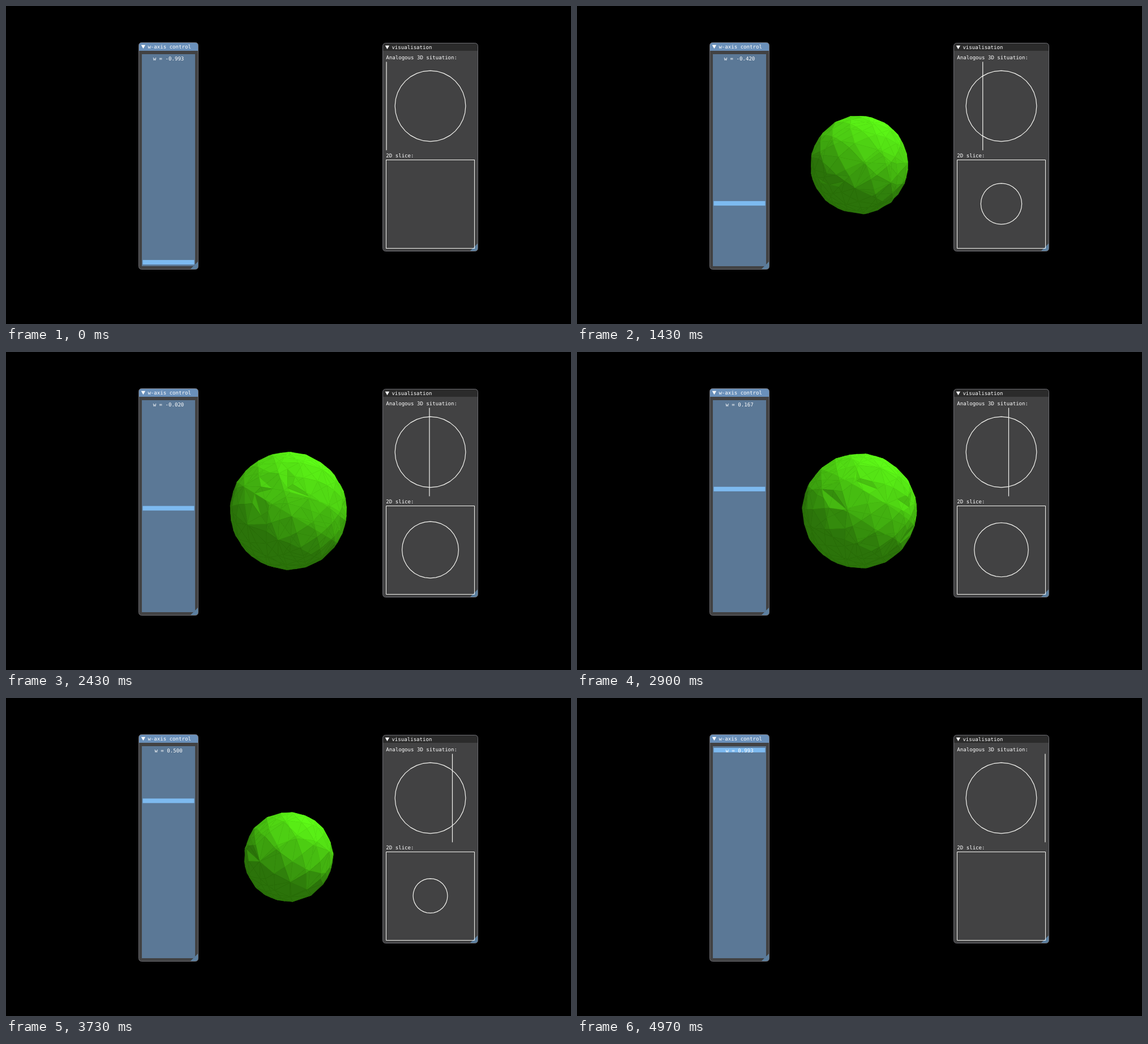
Animation of 998 by 561 pixels, one loop 5.01 s. Source, as an HTML page with a canvas:

```html
<!DOCTYPE html>
<html lang="en">
<head>
<meta charset="utf-8">
<title>4D sphere slices</title>
<style>
  html, body { margin: 0; width: 100%; height: 100%; overflow: hidden; background: #000; }
  canvas { display: block; }
</style>
</head>
<body>
<canvas id="stage" width="998" height="561"></canvas>
<script>
const ctx = document.getElementById('stage').getContext('2d');
const LOOP = 5010, STEPS = 150;
const RADIUS = 0.8, UNIT = 78;
const CAM = 2.263, FOCAL = 275.2, CX = 499, CY = 280.5;
const LIGHT = [1, 2, 1].map(v => v / Math.sqrt(6));
const WHITE = '#f6f6f2';

const dot = (a, b) => a[0] * b[0] + a[1] * b[1] + a[2] * b[2];
const sub = (a, b) => [a[0] - b[0], a[1] - b[1], a[2] - b[2]];
const cross = (a, b) => [
  a[1] * b[2] - a[2] * b[1],
  a[2] * b[0] - a[0] * b[2],
  a[0] * b[1] - a[1] * b[0]
];

// ---- 3-sphere built from a subdivided 16-cell ----
function onSphere(p) {
  const s = RADIUS * 1.003 / Math.hypot(...p);
  return p.map(v => v * s);
}
const mid = (a, b) => onSphere(a.map((v, i) => v + b[i]));

function turn(p, i, j, angle) {
  const c = Math.cos(angle), s = Math.sin(angle), q = p.slice();
  q[i] = c * p[i] - s * p[j];
  q[j] = s * p[i] + c * p[j];
  return q;
}

function split(a, b, c, d, level, out) {
  if (!level) { out.push([a, b, c, d]); return; }
  const ab = mid(a, b), ac = mid(a, c), ad = mid(a, d);
  const bc = mid(b, c), bd = mid(b, d), cd = mid(c, d);
  const parts = [
    [a, ab, ac, ad], [b, ab, bc, bd], [c, ac, bc, cd], [d, ad, bd, cd],
    [ab, cd, ac, ad], [ab, cd, ad, bd], [ab, cd, bd, bc], [ab, cd, bc, ac]
  ];
  for (const t of parts) split(...t, level - 1, out);
}

function buildCells() {
  const cells = [];
  for (let m = 0; m < 16; m++) {
    const corners = [0, 1, 2, 3].map(i => {
      let p = [0, 0, 0, 0];
      p[i] = (m >> i & 1) ? -1 : 1;
      p = turn(p, 0, 3, 0.62);
      p = turn(p, 1, 2, 0.47);
      p = turn(p, 1, 3, 0.38);
      p = turn(p, 0, 1, 0.55);
      return onSphere(p);
    });
    split(...corners, 3, cells);
  }
  return cells;
}
const cells = buildCells();

function cut(a, b, w) {
  const t = (w - a[3]) / (b[3] - a[3]);
  return [0, 1, 2].map(i => a[i] + (b[i] - a[i]) * t);
}

function slice(cell, w) {
  const lo = cell.filter(p => p[3] < w), hi = cell.filter(p => p[3] >= w);
  if (!lo.length || !hi.length) return null;
  if (lo.length === 1) return hi.map(p => cut(lo[0], p, w));
  if (hi.length === 1) return lo.map(p => cut(p, hi[0], w));
  return [[0, 0], [0, 1], [1, 1], [1, 0]].map(([i, j]) => cut(lo[i], hi[j], w));
}

function drawSphere(w) {
  if (Math.abs(w) >= RADIUS) return;
  ctx.lineWidth = 0.6;
  ctx.lineJoin = 'round';
  for (const cell of cells) {
    const face = slice(cell, w);
    if (!face) continue;
    let n = cross(sub(face[1], face[0]), sub(face[2], face[0]));
    const len = Math.hypot(...n);
    if (len < 1e-9) continue;
    const flip = dot(n, face[0]) < 0 ? -1 : 1;
    n = n.map(v => v * flip / len);
    if (dot(n, sub(face[0], [0, 0, CAM])) >= 0) continue;

    const lit = 0.45 + 0.55 * Math.max(0, dot(n, LIGHT));
    ctx.fillStyle = ctx.strokeStyle =
      `rgb(${Math.round(95 * lit)},${Math.round(255 * lit)},${Math.round(23 * lit)})`;
    ctx.beginPath();
    for (const [x, y, z] of face) {
      const s = FOCAL / (CAM - z);
      ctx.lineTo(CX + x * s, CY - y * s);
    }
    ctx.closePath();
    ctx.fill();
    ctx.stroke();
  }
}

// ---- panels ----
function rect(x, y, w, h, color) {
  ctx.fillStyle = color;
  ctx.fillRect(x, y, w, h);
}

function triangle(points, color) {
  ctx.fillStyle = color;
  ctx.beginPath();
  for (const [x, y] of points) ctx.lineTo(x, y);
  ctx.fill();
}

function text(str, x, y, align = 'left') {
  ctx.font = '9.08px "DejaVu Sans Mono", "Liberation Mono", monospace';
  ctx.textRendering = 'geometricPrecision';
  ctx.textAlign = align;
  ctx.fillStyle = '#fff';
  ctx.fillText(str, x, y);
}

function panel(x, y, w, h, title, bar) {
  const r = x + w, b = y + h;
  ctx.save();
  ctx.beginPath();
  ctx.roundRect(x, y, w, h, 5);
  ctx.clip();
  rect(x, y, w, h, '#424243');
  rect(x, y, w, 79 - y, bar);
  triangle([[r, b - 14], [r, b], [r - 14, b]], '#5b7f9f');
  ctx.restore();
  ctx.strokeStyle = '#6c6c72';
  ctx.lineWidth = 1;
  ctx.beginPath();
  ctx.roundRect(x, y, w, h, 5);
  ctx.stroke();
  triangle([[x + 4.2, y + 4.2], [x + 11.6, y + 4.2], [x + 7.9, y + 10.8]], '#fff');
  text(title, x + 15.9, y + 10.6);
}

function ring(x, y, r) {
  const sides = 32;
  ctx.beginPath();
  for (let i = 0; i < sides; i++) {
    const a = i / sides * 2 * Math.PI;
    ctx.lineTo(x + r * Math.cos(a), y + r * Math.sin(a));
  }
  ctx.closePath();
  ctx.stroke();
}

function drawControl(w) {
  panel(234.5, 64.5, 105, 400, 'w-axis control', '#6a90ba');
  rect(240, 85, 94, 374, '#5b7896');
  rect(241.5, 268 - 181.3 * w, 91, 8, '#7dbaf0');
  text('w = ' + w.toFixed(3), 287, 96, 'center');
}

function drawViews(w) {
  const x = 749.5, top = 176.5, low = 349.5;
  panel(665.5, 65.5, 168, 367, 'visualisation', '#2b2b2b');
  text('Analogous 3D situation:', 671.3, 94.3);
  text('2D slice:', 671.3, 266.7);
  ctx.strokeStyle = WHITE;
  ctx.lineWidth = 1.2;
  ring(x, top, UNIT * RADIUS);
  ctx.beginPath();
  ctx.moveTo(x + UNIT * w, top - UNIT);
  ctx.lineTo(x + UNIT * w, top + UNIT);
  ctx.stroke();
  const size = RADIUS * RADIUS - w * w;
  if (size > 0) ring(x, low - 0.5, UNIT * size);
  ctx.lineWidth = 1;
  ctx.strokeRect(x - UNIT, low - UNIT, 2 * UNIT, 2 * UNIT);
}

function draw(step) {
  const w = (2 * step - STEPS + 1) / STEPS;
  rect(0, 0, 998, 561, '#000');
  drawSphere(w);
  drawControl(w);
  drawViews(w);
}

let start = null, shown = -1;
function tick(now) {
  if (start === null) start = now;
  const tens = Math.floor((now - start) % LOOP / 10);
  const step = Math.min(STEPS - 1, Math.floor((tens + 0.5) * 0.3));
  if (step !== shown) draw(shown = step);
  requestAnimationFrame(tick);
}
requestAnimationFrame(tick);
</script>
</body>
</html>
```
